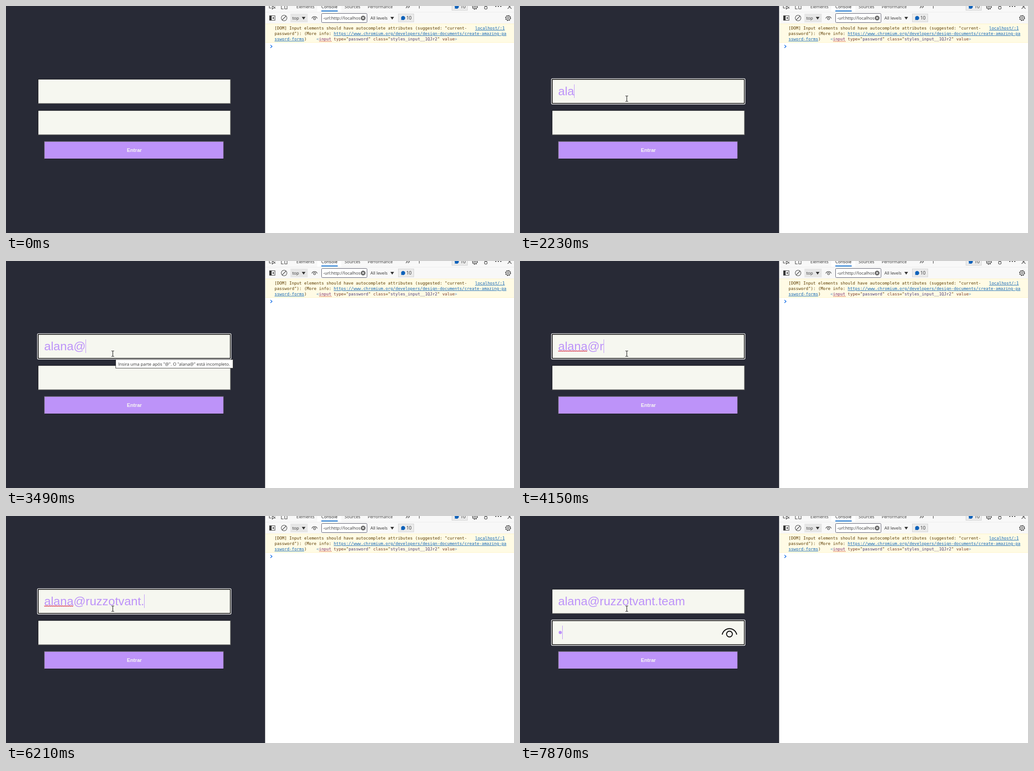
Recreate the animation shown at these times as an HTML page. Size 1118 by 501 pixels, loop 8000 ms.

```html
<!DOCTYPE html>
<html lang="pt">
<head>
<meta charset="utf-8">
<title>Login</title>
<style>
  html, body { margin: 0; width: 100%; height: 100%; overflow: hidden; background: #282a36; }
  svg { display: block; }
  text { white-space: pre; }
  .ui { font: 9.5px "Open Sans", "Noto Sans", sans-serif; fill: #333; }
  .mono { font: 9.03px "DejaVu Sans Mono", monospace; fill: #5c3c00; }
  .link { fill: #0b63b5; text-decoration: underline; }
  .tag { fill: #7d2a6e; }
  .attr { fill: #7b3d2b; }
  .val { fill: #4a3a78; }
  .line { fill: none; stroke: #444; stroke-width: 1.1; }
  #typed { font: 26.4px "Liberation Sans", Arial, sans-serif; font-kerning: none; fill: #bd93f9; }
  #submit { font: bold 11.2px "Liberation Sans", Arial, sans-serif; fill: #f8f8f2; }
</style>
</head>
<body>
<svg width="1118" height="501" viewBox="0 0 1118 501">
  <defs>
    <g id="gear" class="line">
      <circle r="5.6" stroke-width="1.8" stroke-dasharray="2.2 2.2"/>
      <circle r="4.6"/><circle r="1.8"/>
    </g>
    <path id="bubble" d="M0-4.5a4.5 4.5 0 1 1-2.2 8.4L-4.6 4.6-3.9 2.2A4.5 4.5 0 0 1 0-4.5z" fill="#0f62ba"/>
  </defs>

  <!-- login form -->
  <rect width="570" height="501" fill="#282a36"/>
  <g id="form"></g>
  <text id="submit" x="282.5" y="322" text-anchor="middle">Entrar</text>
  <text id="typed" x="84" y="196.5"></text>
  <path id="spell" fill="none" stroke="#d3122f" stroke-width="1.1"/>
  <g id="secret">
    <circle cx="88.6" cy="257" r="3.5" fill="#bd93f9"/>
    <g fill="none" stroke="#111" stroke-width="2.1">
      <path d="M445 261.8a16.3 16.3 0 0 1 32 0"/>
      <circle cx="461" cy="260.5" r="6.4"/>
    </g>
  </g>
  <rect id="caret" width="1" height="30" fill="#bd93f9"/>

  <!-- developer tools -->
  <rect x="570" width="548" height="501" fill="#fff"/>
  <rect x="570" width="1" height="501" fill="#c8c8c8"/>
  <rect x="571" width="547" height="39" fill="#f8f8f8"/>
  <rect x="685" width="53" height="14" fill="#fff"/>
  <rect x="571" y="13" width="547" height="1" fill="#ececec"/>
  <rect x="694" y="10" width="36" height="2" fill="#0b6bcb"/>
  <g class="ui">
    <text x="639" y="4.5" style="font-size:9.3px">Elements</text>
    <text x="694" y="4.5" fill="#111">Console</text>
    <text x="745" y="4.5">Sources</text>
    <text x="796" y="4.5" style="font-size:9.1px">Performance</text>
  </g>
  <g class="line">
    <path d="M579.5 0V4.5H584M592.5 0V1M586-1V7L588.5 4.5H592.5z"/>
    <path d="M606 0V6.5H610M613.5-1H618.5V6.5H613.5zM609 6.5H611"/>
    <path d="M880-1L883.5 1.5 880 4.5M884.5-1L888 1.5 884.5 4.5M909.5 0V5.5"/>
    <circle cx="1056" cy="4" r="3"/><circle cx="1056" cy="-1" r="2.5"/>
    <path d="M1104 6L1112-2M1112.5 6L1104.5-2"/>
  </g>
  <path d="M1077 1h2M1082.5 1h2M1088 1h2" stroke="#333" stroke-width="2"/>
  <rect x="981.5" y="-5" width="34" height="14.5" fill="#ebebeb" stroke="#d2d2d2"/>
  <use href="#bubble" x="992" y="1.5"/>
  <text class="ui" x="1000" y="4.5" style="font-size:10.2px">10</text>
  <use href="#gear" x="1032" y="1.5"/>

  <g class="line">
    <rect x="580" y="21.5" width="12" height="10"/>
    <circle cx="612" cy="26.5" r="6.2"/><path d="M607.7 31L616.3 22"/>
    <path d="M673 27.5C675 22 683 22 685 27.5"/>
    <circle cx="679" cy="28" r="2.2"/>
  </g>
  <path d="M580 21.5h4.5v10H580zM589.5 24v5L586 26.5z" fill="#333"/>
  <rect x="626" y="17" width="38" height="19" fill="#e6e6e6"/>
  <rect x="694.5" y="16.5" width="100" height="20" rx="2" fill="#fff" stroke="#5a5a6a"/>
  <circle cx="786" cy="26.5" r="5.3" fill="#666"/>
  <path d="M783.8 24.3l4.4 4.4m0-4.4l-4.4 4.4" stroke="#fff" stroke-width="1.2"/>
  <path d="M651 24h8l-4 6zM846 24h8l-4 6z" fill="#333"/>
  <rect x="863.5" y="17.5" width="34" height="17.5" fill="#ebebeb" stroke="#d2d2d2"/>
  <use href="#bubble" x="874" y="26.5"/>
  <use href="#gear" x="1105" y="26.5"/>
  <g class="ui">
    <text x="630" y="30">top</text>
    <text x="698" y="30">-url:http://localhos</text>
    <text x="802" y="30">All levels</text>
    <text x="881" y="30" style="font-size:10.2px">10</text>
  </g>

  <rect x="571" y="39" width="547" height="42" fill="#fff3c4"/>
  <rect x="571" y="40" width="547" height="40" fill="#fffbe5"/>
  <g class="mono">
    <text x="591" y="52">[DOM] Input elements should have autocomplete attributes (suggested: "current-</text>
    <text x="1032.5" y="52" class="link">localhost/:1</text>
    <text x="591" y="64">password"): (More info: <tspan class="link">https://www.chromium.org/developers/design-documents/create-amazing-pa</tspan></text>
    <text x="591" y="76"><tspan class="link">ssword-forms</tspan>)    <tspan fill="#5d8fc0">&lt;</tspan><tspan class="tag">input</tspan> <tspan class="attr">type</tspan>="<tspan class="val">password</tspan>" <tspan class="attr">class</tspan>="<tspan class="val">styles_input__1QJr2</tspan>" <tspan class="attr">value</tspan><tspan fill="#5d8fc0">&gt;</tspan></text>
  </g>
  <path id="lint" fill="none" stroke="#d9553f" stroke-width=".8"/>
  <path d="M582 86l3.5 3.2-3.5 3.2" fill="none" stroke="#1a73e8" stroke-width="1.5"/>

  <!-- overlays -->
  <g id="tip">
    <rect x="241.5" y="217.5" width="258" height="19" fill="#fff" stroke="#444"/>
    <text class="ui" x="247" y="230.5">Insira uma parte após "@". O "alana@" está incompleto.</text>
  </g>
  <circle id="click" cx="233" cy="204" r="10" fill="#faed5a"/>
  <path id="arrow" d="M0 0V16L3.8 12.5 6.3 18.3 8.7 17.2 6.2 11.6H11.3z" fill="#fff" stroke="#000" stroke-width=".9"/>
  <path id="beam" d="M-3-6H-1L0-5.3 1-6H3M0-5.3V5.3M-3 6H-1L0 5.3 1 6H3" fill="none" stroke="#222" stroke-width="1.2"/>
</svg>
<script>
const LOOP = 8000, STEP = 70;
const MOVE = 330, CLICK = 960, TAB = 7410, MASK = 7870;
const EMAIL = 'alana@ruzzotvant.team';
const KEYS = [2030, 2130, 2230, 2500, 2630, 2960, 4120, 4220, 4330, 4430, 4540,
  5020, 5350, 5550, 5680, 5880, 6210, 6610, 6810, 7010, 7150];
const FROM = [794, 428], TO = [235, 204.5];
const FIELD_X = 70, FIELD_Y = [161, 230], FIELD_W = 424.6, FIELD_H = 54.8;

const $ = id => document.getElementById(id);
const show = (id, on) => $(id).style.display = on ? '' : 'none';
const within = (t, a, b) => t >= a && t < b;

function bevel(x, y, w, h, fill, topLeft, bottomRight) {
  const b = 1.2;
  return `<rect x="${x}" y="${y}" width="${w}" height="${h}" fill="${topLeft}"/>
    <path d="M${x} ${y + h}l${b} ${-b}H${x + w - b}V${y + b}l${b} ${-b}v${h}z" fill="${bottomRight}"/>
    <rect x="${x + b}" y="${y + b}" width="${w - 2 * b}" height="${h - 2 * b}" fill="${fill}"/>`;
}

// Rectangle around a field, grown outwards by d
const outline = (y, d, attrs) =>
  `<rect x="${FIELD_X - d}" y="${y - d}" width="${FIELD_W + 2 * d}" height="${FIELD_H + 2 * d}" ${attrs}/>`;

const focusRing = (y, i) => `<g id="ring${i}" fill="none">
  ${outline(y, -.8, 'stroke="#101010" stroke-width="1.8"')}
  ${outline(y, .7, 'rx="2" stroke="#fff" stroke-width="1.3"')}</g>`;

function wave(x, end, y) {
  let d = `M${x} ${y}`;
  for (let up = 1; x < end; up = -up) d += `l2 ${up * 1.2}`, x += 2;
  return d;
}

$('form').innerHTML =
  FIELD_Y.map((y, i) => bevel(FIELD_X, y, FIELD_W, FIELD_H, '#f6f7f0', '#16171c', '#70716f') + focusRing(y, i)).join('') +
  bevel(84, 298.6, 395.6, 39.4, '#bd93f9', '#77717f', '#14141c');
$('spell').setAttribute('d', wave(84, 148, 198.2));
$('lint').setAttribute('d', wave(689, 716, 77.5));

function drawPointer(t) {
  const k = Math.min(1, Math.floor((t - MOVE) / STEP) / 8);
  const ease = k * k * (3 - 2 * k);
  const [x, y] = FROM.map((a, i) => a + (TO[i] - a) * ease);
  const overField = x > FIELD_X && x < FIELD_X + FIELD_W && FIELD_Y.some(f => y > f && y < f + FIELD_H);
  show('arrow', t >= MOVE && !overField);
  show('beam', t >= MOVE && overField);
  for (const id of ['arrow', 'beam']) $(id).setAttribute('transform', `translate(${x} ${y})`);
  show('click', within(t, CLICK, CLICK + STEP));
}

function drawForm(t) {
  const typed = $('typed'), inSecret = t >= TAB;
  typed.textContent = EMAIL.slice(0, KEYS.filter(k => k <= t).length);
  show('ring0', within(t, CLICK, TAB));
  show('ring1', inSecret);
  show('spell', within(t, KEYS[6], TAB));
  show('secret', t >= MASK);
  show('tip', within(t, 3490, KEYS[6]));

  const blinkedOff = within(t, 1500, 2030) || within(t, 3560, 4020);
  show('caret', t >= CLICK && !blinkedOff);
  const x = inSecret ? (t >= MASK ? 93 : 84) : 84 + Math.round(typed.getComputedTextLength());
  $('caret').setAttribute('x', x);
  $('caret').setAttribute('y', inSecret ? 242 : 173);
}

const start = performance.now();
function frame() {
  const t = (performance.now() - start) % LOOP;
  drawForm(t);
  drawPointer(t);
  requestAnimationFrame(frame);
}
frame();
</script>
</body>
</html>
```
